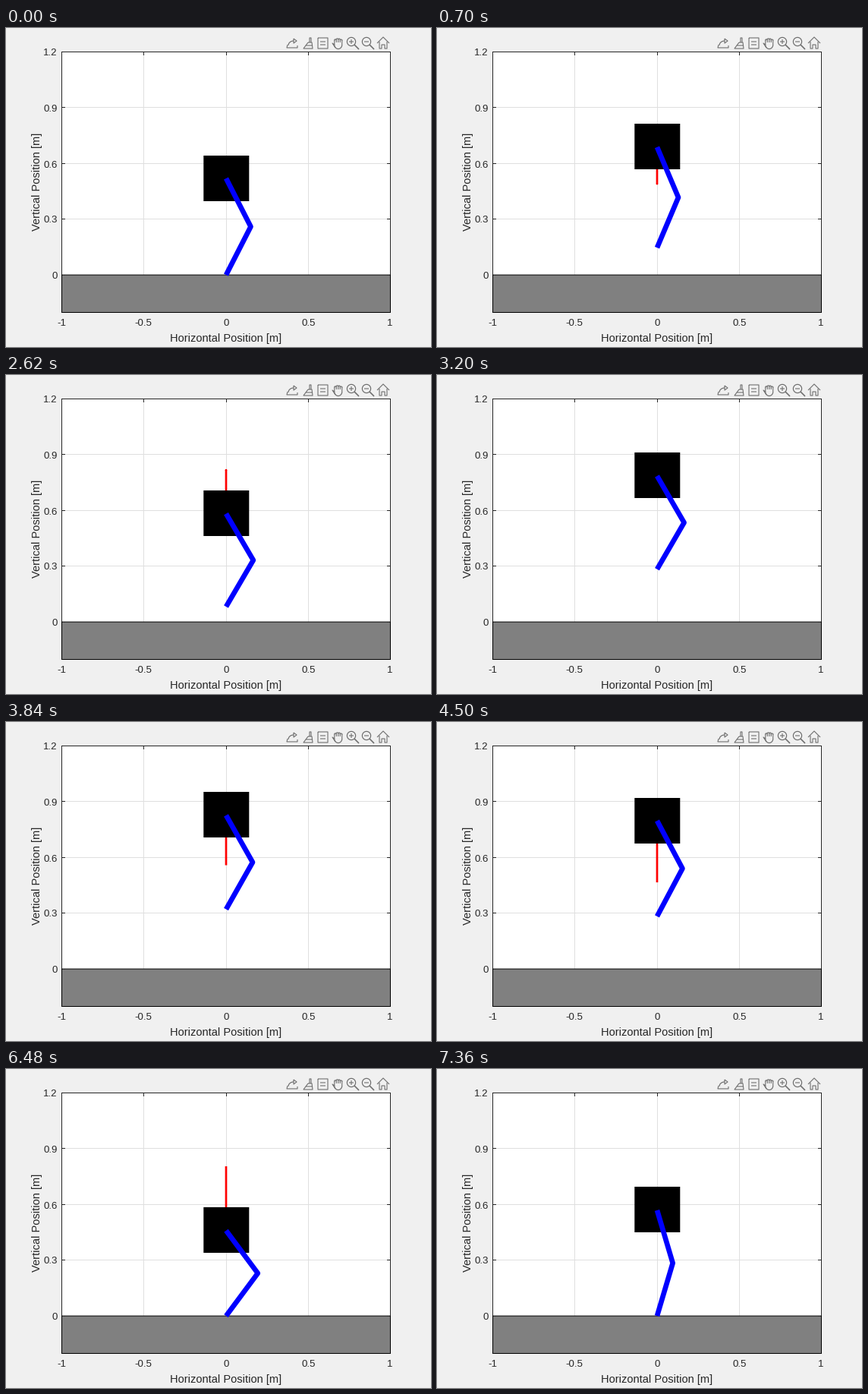
Animation, 560 px wide and 420 px high, one loop 7440 ms. Source, as a matplotlib script:

```python
import numpy as np
import matplotlib.pyplot as plt
from matplotlib.animation import FuncAnimation
from matplotlib.patches import Rectangle

W, H, DPI = 560, 420, 100
PX = 72 / DPI                       # one pixel in points
INK, ICON = "#262626", "#6e6e6e"
plt.rcParams["font.family"] = "Liberation Sans"
plt.rcParams["path.snap"] = False

# Hopper: lengths in metres, times in simulation steps of 1/60 s
G = 9.81 / 3600
LINK, L_START, L_DIP, L_AIR, L_PUSH = 0.3, 0.5196, 0.491, 0.50, 0.587
DIP_END, FIRST_APEX, SQUEEZE, RETRACT = 23.0, 43.7, 2.5, 4.75
TRAIL, STEPS, LOOP = 14, 368, 372

# Axes area in pixels
LEFT, RIGHT, TOP, BOTTOM = 73.5, 506.5, 31.5, 374.5
X0, Y0, SX, SY = 290.0, 325.1, 216.5, 244.6


def apex_height(k):
    return 0.832 - 0.041 * 0.6 ** k


def lowest_leg(k):
    return 0.458 + 0.020 * 0.65 ** k


def push_power(k):
    return 1.91 + 1.03 * 0.05 ** k


def rise_time(k):
    return np.sqrt(2 * (apex_height(k) - L_PUSH) / G)


def fall_time(k):
    return np.sqrt(2 * (apex_height(k) - L_AIR) / G)


def squeeze_time(k):
    return SQUEEZE * (L_AIR - lowest_leg(k)) / (G * fall_time(k))


def push_time(k):
    return push_power(k) * (L_PUSH - lowest_leg(k)) / (G * rise_time(k + 1))


def pose(t):
    """Hip height and leg length at step t."""
    apex, k = FIRST_APEX, 0
    lift = apex - rise_time(0)
    if t < DIP_END:
        leg = L_DIP + (L_START - L_DIP) * (1 + np.cos(np.pi * t / DIP_END)) / 2
        return leg, leg
    if t < lift:
        leg = L_DIP + (L_PUSH - L_DIP) * ((t - DIP_END) / (lift - DIP_END)) ** 3
        return leg, leg
    while True:
        land = apex + fall_time(k)
        if t < land:
            hip = apex_height(k) - G * (t - apex) ** 2 / 2
            return hip, L_AIR + (L_PUSH - L_AIR) * np.exp((lift - t) / RETRACT)
        low, deepest = lowest_leg(k), land + squeeze_time(k)
        if t < deepest:
            leg = low + (L_AIR - low) * ((deepest - t) / (deepest - land)) ** SQUEEZE
            return leg, leg
        lift = deepest + push_time(k)
        if t < lift:
            u = (t - deepest) / push_time(k)
            leg = low + (L_PUSH - low) * u ** push_power(k)
            return leg, leg
        k += 1
        apex = lift + rise_time(k)


POSES = [pose(t) for t in range(STEPS + 1)]
HIP_Y = np.array([Y0 - SY * hip for hip, _ in POSES])

fig = plt.figure(figsize=(W / DPI, H / DPI), dpi=DPI, facecolor="#f0f0f0")
ax = fig.add_axes([0, 0, 1, 1])
ax.set(xlim=(0, W), ylim=(H, 0))
ax.axis("off")


def line(xs, ys, color=INK, width=1.0, z=3):
    return ax.plot(xs, ys, color=color, lw=width * PX, zorder=z,
                   solid_capstyle="butt", solid_joinstyle="round")[0]


def label(x, y, text, size=13.2, **kw):
    ax.text(x, y, text, fontsize=size * PX, color=INK, **kw)


def pixel_centre(v):
    return np.floor(v) + 0.5


def draw_axes():
    ax.add_patch(Rectangle((LEFT, TOP), RIGHT - LEFT, BOTTOM - TOP, fc="white", zorder=0))
    for v in np.linspace(-1, 1, 5):
        x = pixel_centre(X0 + SX * v)
        line([x, x], [TOP, BOTTOM], "#dfdfdf", z=1)
        line([x, x], [TOP, TOP + 4.5])
        label(x - 0.3, 392.5, f"{v:g}", ha="center", va="baseline")
    for v in np.linspace(0, 1.2, 5):
        y = pixel_centre(Y0 - SY * v)
        line([LEFT, RIGHT], [y, y], "#dfdfdf", z=1)
        line([LEFT, LEFT + 4.5], [y, y])
        line([RIGHT, RIGHT - 4.5], [y, y])
        label(67.5, y + 5, f"{v:g}", ha="right", va="baseline")
    line([LEFT, RIGHT, RIGHT, LEFT, LEFT], [TOP, TOP, BOTTOM, BOTTOM, TOP])
    ax.add_patch(Rectangle((LEFT, Y0), RIGHT - LEFT, BOTTOM - Y0, fc="#808080",
                           ec="black", lw=PX, zorder=3.5))
    label(290, 413, "Horizontal Position [m]", 14.6, ha="center", va="baseline")
    label(41.5, 202.5, "Vertical Position [m]", 14.6, ha="center", va="center",
          rotation=90)


def draw_toolbar(y=20):
    def stroke(x, *points, width=1.1):
        px, py = np.transpose(points)
        line(x + px, y + py, ICON, width)

    def arc(x, dy, rx, ry, start, end):
        a = np.linspace(start, end, 40) * np.pi
        line(x + rx * np.cos(a), y + dy + ry * np.sin(a), ICON, 1.2)

    def export(x):
        stroke(x, (-6, 2), (-7, 6), (7, 6), (7, 3))
        arc(x + 2, 3, 7, 6, 1, 1.5)
        stroke(x, (2, -6), (6, -3), (2, 0), (2, -6))

    def brush(x):
        stroke(x, (2, -1), (2, -7), (4, -7), (4, -1))
        stroke(x, (0, -1), (5, -1), (6, 7), (-6, 7), (0, -1))
        stroke(x, (-3, 3), (5, 3))

    def data_tip(x):
        stroke(x, (-6, -7), (7, -7), (7, 7), (-6, 7), (-6, -7))
        for dy in (-2, 2):
            stroke(x, (-3, dy), (4, dy))

    def hand(x):
        for i in range(4):
            arc(x - 3 + 2.5 * i, -5 + abs(i - 1.4), 1.25, 1.5, 1, 2)
        for i in range(5):
            dx = -4.25 + 2.5 * i
            stroke(x, (dx, -4.5), (dx, 2 if i in (0, 4) else -1))
        arc(x + 0.75, 2, 5, 5.5, 0, 1)
        stroke(x, (-4, 2), (-7, 0), (-3, 6))

    def zoom(x, zoom_in):
        arc(x - 2, -2, 5.6, 5.6, 0, 2)
        stroke(x, (2, 2), (8, 8), width=1.6)
        stroke(x, (-5, -2), (1, -2))
        if zoom_in:
            stroke(x, (-2, -5), (-2, 1))

    def home(x):
        stroke(x, (-8, 0), (0, -8), (8, 0))
        stroke(x, (-5, -2), (-5, 7), (-2, 7), (-2, 2), (2, 2), (2, 7), (5, 7), (5, -2))

    export(377)
    brush(398)
    data_tip(417)
    hand(437)
    zoom(457, True)
    zoom(477, False)
    home(497)


draw_axes()
draw_toolbar()
trail = line([], [], "red", 2.7, z=4)
body = ax.add_patch(Rectangle((X0 - 29.7, 0), 60, 60, fc="black", lw=0, zorder=5))
leg_line = line([], [], "blue", 6.7, z=6)


def update(i):
    t = min(i, STEPS)
    _, leg = POSES[t]
    knee = np.sqrt(LINK ** 2 - leg ** 2 / 4)
    y = HIP_Y[t]
    past = HIP_Y[max(0, t - TRAIL):t + 1]
    trail.set_data(np.full(len(past), X0), past)
    body.set_y(round(y - 30.5))
    leg_line.set_data([X0, X0 + SX * knee, X0], [y, y + SY * leg / 2, y + SY * leg])
    return trail, body, leg_line


anim = FuncAnimation(fig, update, frames=LOOP, interval=20, repeat=True, repeat_delay=0)
plt.show()
```
